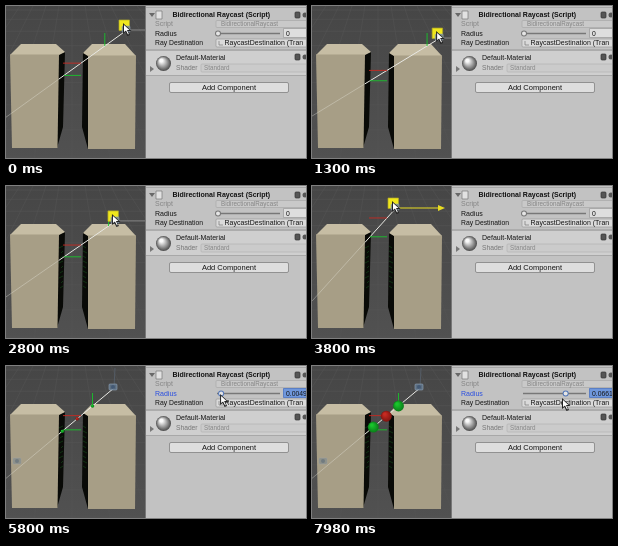
Write an HTML page with a canvas that moves like this. It is 300 px wide and 152 px high and loops after 8 s.

```html
<!DOCTYPE html>
<html>
<head>
<meta charset="utf-8">
<style>
html, body { margin: 0; width: 100%; height: 100%; overflow: hidden; background: #c2c2c2; }
canvas { display: block; width: 300px; height: 152px; }
</style>
</head>
<body>
<canvas id="stage"></canvas>
<script>
const canvas = document.getElementById('stage');
const scale = window.devicePixelRatio || 1;
canvas.width = 300 * scale;
canvas.height = 152 * scale;
const c = canvas.getContext('2d');
c.scale(scale, scale);

const LOOP = 8000, RELEASE = 4200, SLIDE_START = 5440, SLIDE_END = 7720;
const GREEN = '#19c52c', RED = '#c62a22', FRONT = '#a79e86', ROOF = '#c6bda4', SIDE = '#090a07';
const source = { x: 10, y: 104 };

// key points of the pointer: time, x, y
const pointer = [
  [0, 118, 18], [780, 113, 10], [2000, 144, 51], [3240, 92, 20], [3540, 92, 20],
  [3800, 81, 16], [RELEASE, 105, 16], [4780, 240, 39], [SLIDE_START, 212, 29],
  [SLIDE_END, 254, 29], [7980, 251, 33]
];

function pointerAt(t) {
  if (t > SLIDE_START && t < SLIDE_END) return { x: knobX(radiusAt(t)), y: 29 };
  const i = pointer.findIndex(k => k[0] > t);
  const [t1, x1, y1] = pointer.at(i < 0 ? -1 : i);
  const [t0, x0, y0] = pointer.at(i < 0 ? -1 : i - 1);
  const p = t1 > t0 ? (t - t0) / (t1 - t0) : 1, e = p * p * (3 - 2 * p);
  return { x: x0 + (x1 - x0) * e, y: y0 + (y1 - y0) * e };
}

function radiusAt(t) {
  const p = Math.min(1, Math.max(0, (t - SLIDE_START) / (SLIDE_END - SLIDE_START)));
  return .0661 * p ** 1.41;
}

function knobX(radius) {
  return 212 + radius * 630;
}

function poly(fill, ...p) {
  c.beginPath();
  for (let i = 0; i < p.length; i += 2) c.lineTo(p[i], p[i + 1]);
  c.closePath();
  c.fillStyle = fill;
  c.fill();
}

function line(color, x1, y1, x2, y2, width = 1) {
  c.beginPath();
  c.moveTo(x1, y1);
  c.lineTo(x2, y2);
  c.strokeStyle = color;
  c.lineWidth = width;
  c.stroke();
}

function disc(fill, x, y, r) {
  c.beginPath();
  c.arc(x, y, r, 0, 7);
  c.fillStyle = fill;
  c.fill();
}

function rect(fill, x, y, w, h, border, radius = 0) {
  c.beginPath();
  c.roundRect(x, y, w, h, radius);
  c.fillStyle = fill;
  c.fill();
  if (border) {
    c.strokeStyle = border;
    c.lineWidth = .7;
    c.stroke();
  }
}

function text(s, x, y, color = '#161616', size = 7, bold = '') {
  c.font = `${bold} ${size}px "Liberation Sans", Arial, sans-serif`;
  c.fillStyle = color;
  c.fillText(s, x, y);
}

function ball(x, y, r, light, dark) {
  const g = c.createRadialGradient(x - r * .3, y - r * .4, r * .2, x, y, r);
  g.addColorStop(0, light);
  g.addColorStop(1, dark);
  disc(g, x, y, r);
}

function grid() {
  const g = c.createLinearGradient(0, 0, 0, 152);
  g.addColorStop(0, '#464646');
  g.addColorStop(1, '#515151');
  rect(g, 0, 0, 139, 152);
  for (let i = -8; i <= 8; i++) line('#555', 66 + i * 13, 0, 66 + i * 38, 152, .5);
  for (let i = 0; i < 9; i++) {
    const y = 4 + i * 8 + i * i * 1.3;
    line('#555', 0, y, 139, y, .5);
  }
}

function walls(scarred) {
  poly(SIDE, 52, 48, 59, 46, 57, 121, 51, 142);
  poly(SIDE, 82, 50, 77, 46, 76, 121, 82, 143);
  for (let y = 60; scarred && y < 105; y += 5) {
    line('#145a1d', 53 + y % 3, y + 2, 57, y, .5);
    line('#145a1d', 77, y, 80 + y % 2, y + 2, .5);
  }
  poly(ROOF, 4, 49, 15, 38, 50, 38, 59, 46, 53, 49);
  poly(ROOF, 77, 47, 86, 38, 119, 38, 130, 50, 82, 50);
  poly(FRONT, 4, 48.5, 53, 48.5, 51.5, 142, 6, 142);
  poly(FRONT, 82, 49.5, 130, 49.5, 129, 143, 82, 143);
}

function cameraIcon(x, y, alpha) {
  c.globalAlpha = alpha;
  rect('#62788f', x - 5, y - 4, 8, 6, '#93a9c0', 1);
  disc('#3d5470', x - 1, y - 1, 2);
  c.globalAlpha = 1;
}

function scene(t, radius) {
  const hand = pointerAt(Math.min(t, RELEASE));
  const x = hand.x + 3, y = hand.y + 6;
  const slope = (y - source.y) / (x - source.x);
  const at = px => source.y + slope * (px - source.x);

  c.save();
  c.beginPath();
  c.rect(0, 0, 139, 152);
  c.clip();
  grid();
  walls(t > 1800);

  // faint where the ray runs inside the left wall
  line('rgba(235,235,225,.35)', 0, at(0), 53, at(53));
  line('#e8e8e3', 53, at(53), x, y);

  line(GREEN, 58, at(58), 75, at(58), .9);
  line(RED, 57, at(75), 75, at(75), .9);
  const roofX = source.x + (40 - source.y) / slope;
  const hitsRoof = roofX > 80 && roofX < 128;
  if (hitsRoof) line(GREEN, roofX, 40, roofX, 27, .9);

  if (radius > 0) {
    const r = 1.5 + radius * 60;
    ball(56 + radius * 80, at(56 + radius * 80), r, GREEN, '#0a7d19');
    ball(roofX, 40, r, GREEN, '#0a7d19');
    ball(71 + radius * 50, at(71 + radius * 50), r, RED, '#7f1410');
  }

  if (t < RELEASE) {
    const axis = t > 3000 ? '#e8dc22' : '#858585';
    line(axis, x, y, x + 43, y);
    poly(axis, x + 42, y - 3, x + 49, y, x + 42, y + 3);
    if (x < 139) rect('#f0e71c', x - 8, y - 10, 10.5, 10.5, '#aca527');
  } else {
    line('#5a6573', x, y, x + 1, 2, .7);
    cameraIcon(source.x + 2, source.y - 8, .35);
  }
  cameraIcon(x, y, .8);
  c.restore();
}

function helpIcons(y) {
  rect('#555', 289, y, 5, 6, '#333', 1);
  disc('#555', 299, y + 3, 2.5);
}

function inspector(radius, active) {
  rect('#c2c2c2', 139, 0, 161, 152);
  line('#777', 139.5, 0, 139.5, 152);
  line('#9b9b9b', 140, 1.5, 300, 1.5, .7);
  poly('#686868', 143, 7, 149, 7, 146, 11);
  rect('#e2e2e2', 150, 5, 6, 8, '#777');
  text('Bidirectional Raycast (Script)', 166.5, 11.3, '#111', 7, 'bold');
  helpIcons(6);

  text('Script', 149, 20, '#858585');
  rect('#c9c9c9', 210, 14.5, 92, 7, '#aaa', 1);
  text('BidirectionalRaycast', 215, 20, '#858585', 6.3);

  text('Radius', 149, 29.7, active ? '#2a4fe0' : '#161616');
  line('#777', 211, 27.5, 274, 27.5, 1.5);
  disc(active ? '#5176b8' : '#777', knobX(radius), 27.5, 3);
  disc('#e5e5e5', knobX(radius), 27.5, 2);
  rect(active ? '#6f97dc' : '#dedede', 277.5, 22.5, 24, 9, active ? '#3f6cc0' : '#999');
  text(radius ? radius.toFixed(4) : '0', 280, 29.7, '#161616', 6.8);

  text('Ray Destination', 149, 39, '#161616', 6.8);
  rect('#dadada', 210, 33, 92, 8, '#999', 1);
  line('#777', 213, 39, 213, 35, .7);
  line('#777', 213, 39, 217, 39, .7);
  text('RaycastDestination (Tran', 218.5, 39);

  line('#8c8c8c', 140, 44, 300, 44, .8);
  rect('#cfcfcf', 140, 45, 160, 24);
  poly('#777', 144, 60, 148, 63, 144, 66);
  ball(157.5, 57.5, 7.5, '#fafafa', '#4a4a4a');
  text('Default-Material', 170, 54);
  helpIcons(48);
  text('Shader', 170, 64, '#777', 6.7);
  rect('#cbcbcb', 195, 58, 106, 8, '#b2b2b2', 1);
  text('Standard', 198, 64, '#888', 6.3);
  line('#a2a2a2', 140, 69.5, 300, 69.5, .8);

  rect('#dedede', 163.5, 76.5, 119, 10, '#777', 1.5);
  c.textAlign = 'center';
  text('Add Component', 223, 84.2, '#161616', 7.5);
  c.textAlign = 'left';
}

function cursor({ x, y }) {
  c.save();
  c.translate(x, y);
  poly('#222', -1, -1, -1, 10, 1.5, 8, 3.5, 12, 6, 11, 4, 7, 7.5, 7);
  poly('#fff', 0, 1, 0, 8, 2, 6.5, 4, 10.5, 4.8, 10, 3, 6, 5.5, 6);
  c.restore();
}

function draw() {
  const t = performance.now() % LOOP;
  const radius = radiusAt(t);
  scene(t, radius);
  inspector(radius, t >= SLIDE_START);
  cursor(pointerAt(t));
  requestAnimationFrame(draw);
}
draw();
</script>
</body>
</html>
```
